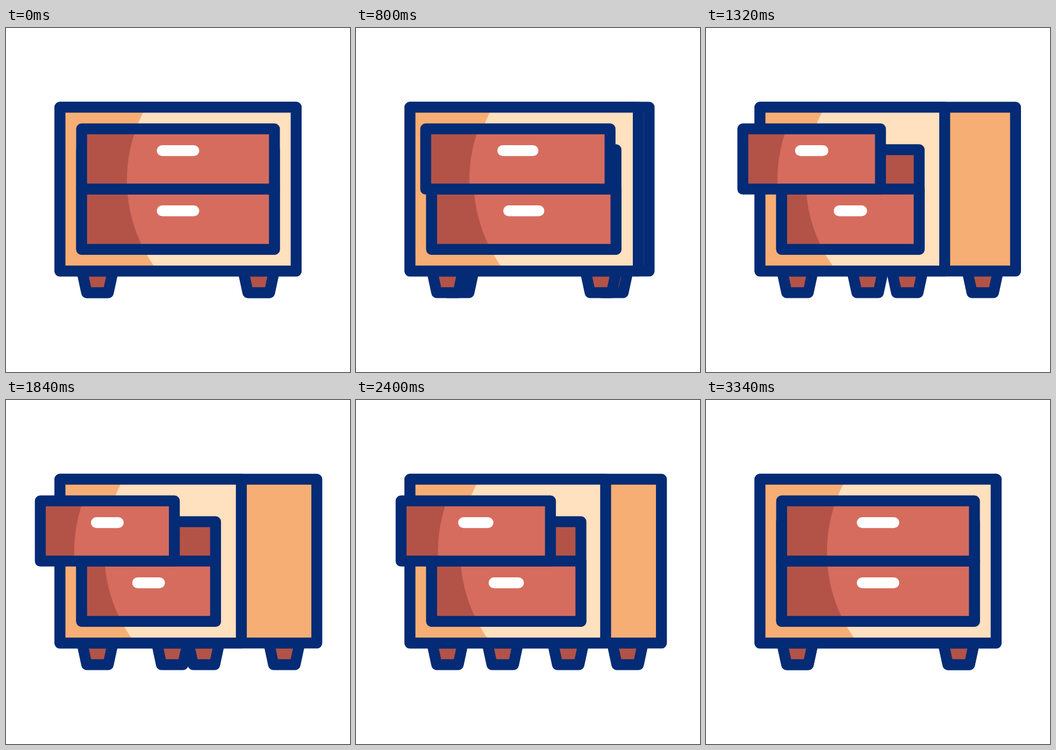
Animation of 640x640 px, one loop 3.6 s. Source, as an HTML page:

```html
<!DOCTYPE html>
<html lang="en">
<head>
<meta charset="utf-8">
<title>Chest of drawers</title>
<style>
  html, body { margin: 0; width: 100%; height: 100%; overflow: hidden; background: #fff; }
  svg { display: block; width: 100vw; height: 100vh; }
  .outline { stroke: #042b75; stroke-width: 20.3; stroke-linejoin: round; }
  .handle { stroke: #fff; stroke-width: 20.3; stroke-linecap: round; }
</style>
</head>
<body>
<svg id="stage" viewBox="0 0 640 640"></svg>
<script>
const LOOP = 3600;
const OPENING = { start: 305, length: 1390 };
const CLOSING = { start: 1712, length: 1610 };
const EASE_WEIGHT = 0.75;

const WOOD = { light: '#ffe0bf', shade: '#f7ae74' };
const RED = { light: '#d66c5e', shade: '#b35348' };

const stage = document.getElementById('stage');

function add(parent, name, attrs = {}) {
  const node = document.createElementNS('http://www.w3.org/2000/svg', name);
  set(node, attrs);
  parent.append(node);
  return node;
}

function set(node, attrs) {
  for (const key in attrs) node.setAttribute(key, attrs[key]);
}

// Symmetric cubic bezier (w, 0, 1 - w, 1), solved by bisection.
function ease(x) {
  if (x <= 0) return 0;
  if (x >= 1) return 1;
  const w = EASE_WEIGHT;
  let low = 0, high = 1, s = 0.5;
  for (let i = 0; i < 30; i++) {
    s = (low + high) / 2;
    const r = 1 - s;
    const at = 3 * w * s * r * r + 3 * (1 - w) * s * s * r + s * s * s;
    if (at < x) low = s; else high = s;
  }
  return s * s * (3 - 2 * s);
}

function openness(time) {
  const phase = ({ start, length }) => ease((time - start) / length);
  return phase(OPENING) - phase(CLOSING);
}

// Each part returns a function that poses it for an openness from 0 to 1.
function foot(x, travel) {
  const node = add(stage, 'path', {
    class: 'outline', fill: RED.shade,
    d: 'M-28.7 452.2H28.7L20 492.4H-20Z'
  });
  return p => set(node, { transform: `translate(${x + travel * p} 0)` });
}

function box(fill, top, bottom, left, right) {
  const node = add(stage, 'rect', { class: 'outline', fill, y: top, height: bottom - top });
  return p => {
    const x = left(p);
    set(node, { x, width: right(p) - x });
  };
}

let clipCount = 0;

function panel(colors, top, bottom, left, right, shadeTravel) {
  const id = 'panel' + clipCount++;
  const y = top, height = bottom - top;
  const clip = add(add(stage, 'clipPath', { id }), 'rect', { y, height });
  const base = add(stage, 'rect', { y, height, fill: colors.shade });
  const lit = add(add(stage, 'g', { 'clip-path': `url(#${id})` }), 'circle',
    { cy: 283, r: 279, fill: colors.light });
  const poseFrame = box('none', top, bottom, left, right);
  return p => {
    const x = left(p);
    for (const rect of [clip, base]) set(rect, { x, width: right(p) - x });
    set(lit, { cx: 504 - shadeTravel * p });
    poseFrame(p);
  };
}

function drawer(top, bottom, left, right, shadeTravel) {
  const posePanel = panel(RED, top, bottom, left, right, shadeTravel);
  const y = top + 40.4;
  const handle = add(stage, 'line', { class: 'handle', y1: y, y2: y });
  return p => {
    posePanel(p);
    const middle = (left(p) + right(p)) / 2;
    const half = (58.8 - 18.2 * p) / 2;
    set(handle, { x1: middle - half, x2: middle + half });
  };
}

const move = (from, travel) => p => from + travel * p;
const cabinetLeft = move(100.4, 0);
const drawerLeft = move(140.7, 0);
const lowerRight = move(499.4, -110);

const parts = [
  foot(170.2, 139.6),
  foot(470.2, 47.8),
  foot(170.2, 0),
  foot(470.2, -102.4),
  box(WOOD.shade, 147.4, 452.2, cabinetLeft, move(539.8, 38.6)),
  panel(WOOD, 147.4, 452.2, cabinetLeft, move(539.8, -102.4), 42.2),
  box(RED.shade, 226.4, 411.8, drawerLeft, lowerRight),
  drawer(299.7, 411.8, drawerLeft, lowerRight, 42.2),
  drawer(187.7, 299.7, move(140.7, -77.2), move(499.4, -187), 98.6)
];

function render(now) {
  const p = openness(now % LOOP);
  for (const pose of parts) pose(p);
  requestAnimationFrame(render);
}

render(0);
</script>
</body>
</html>
```
